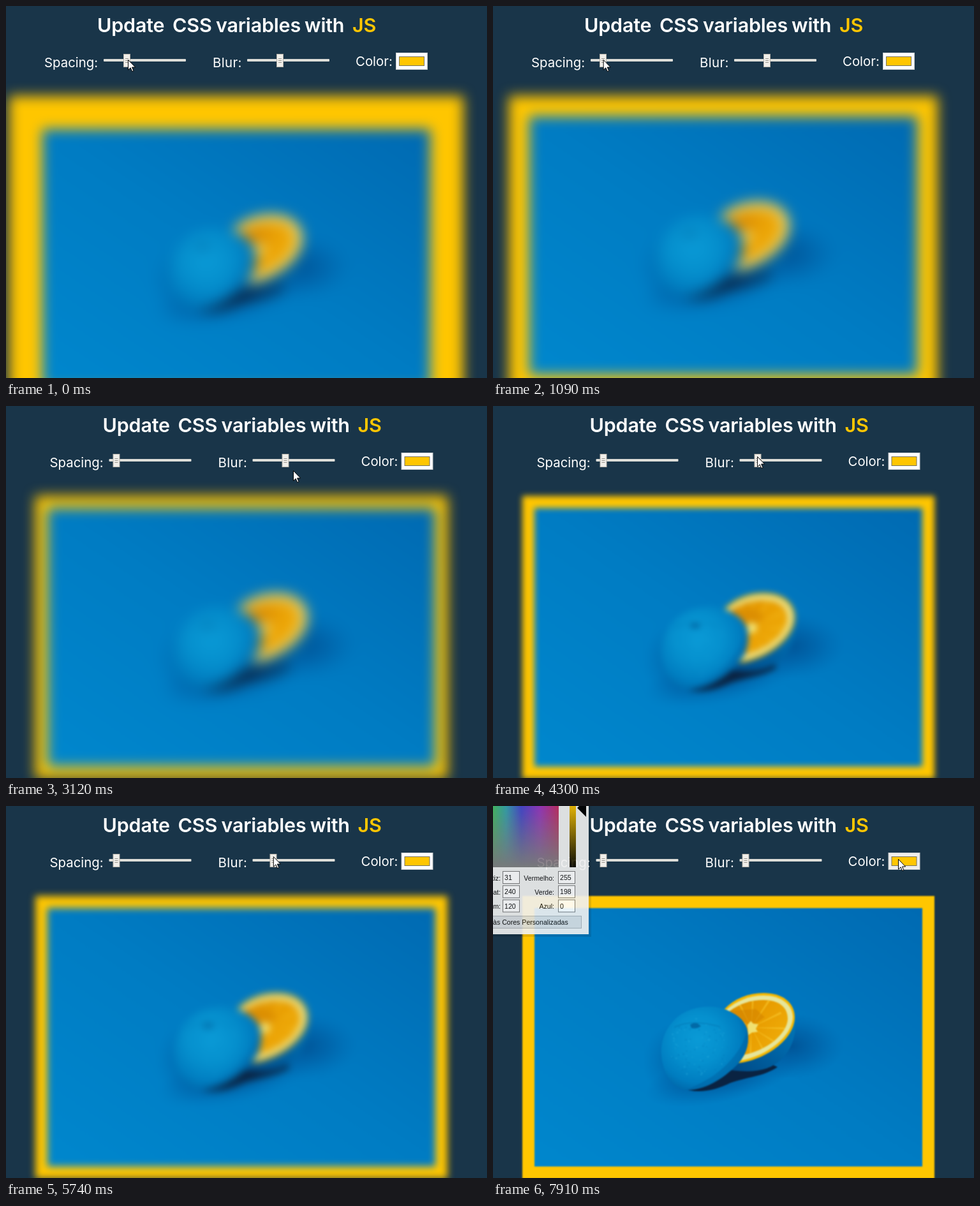
An HTML page for the animation above (8000 ms loop, 754x583 px).

```html
<!DOCTYPE html>
<html lang="en">
<head>
<meta charset="utf-8">
<title>Update CSS variables with JS</title>
<style>
  :root { --pad: 52px; --blur: 10px; --shift: 0px; }
  html, body { margin: 0; width: 100%; height: 100%; overflow: hidden; background: #193549; }
  #stage { position: absolute; inset: 0; overflow: hidden; }
  #photo {
    position: absolute; top: 141px; left: calc(56.5px + var(--shift) - var(--pad));
    width: 608px; height: 405px; padding: var(--pad);
    background: #ffc600; filter: blur(var(--blur));
  }
  #photo svg { display: block; }
  #ui { position: absolute; left: 0; top: 0; }
  #head { transform: translateX(var(--shift)); fill: #fff; font: 20.4px Inter, sans-serif; }
  #title { font-size: 30.5px; font-weight: 600; letter-spacing: -.2px; }
  #dialog { font: 10.6px "Liberation Sans", sans-serif; fill: #111; transform-origin: -90px 20px; }
  .end { text-anchor: end; }
  .box { fill: #fff; stroke: #7a7a7a; }
</style>
</head>
<body>
<div id="stage">
  <div id="photo">
    <svg width="608" height="405" viewBox="65 160 608 405">
      <defs>
        <linearGradient id="wall" x1="0" y1="1" x2="1" y2="0">
          <stop offset="0" stop-color="#0087cd"/>
          <stop offset=".5" stop-color="#007cc3"/>
          <stop offset="1" stop-color="#006ab2"/>
        </linearGradient>
        <radialGradient id="shade">
          <stop offset="0" stop-color="#004c8e" stop-opacity=".85"/>
          <stop offset=".5" stop-color="#00559a" stop-opacity=".5"/>
          <stop offset="1" stop-color="#0060a8" stop-opacity="0"/>
        </radialGradient>
        <radialGradient id="dome" gradientUnits="userSpaceOnUse" cx="322" cy="366" r="84">
          <stop offset="0" stop-color="#0a9ad6"/>
          <stop offset=".45" stop-color="#0590ce"/>
          <stop offset=".8" stop-color="#007dc0"/>
          <stop offset="1" stop-color="#0068aa"/>
        </radialGradient>
        <linearGradient id="under" x1="0" y1="1" x2="1" y2="0">
          <stop offset="0" stop-color="#004a86"/>
          <stop offset=".6" stop-color="#0066a8"/>
          <stop offset="1" stop-color="#0078b8"/>
        </linearGradient>
        <linearGradient id="pulp" x1="0" y1="0" x2="1" y2=".5">
          <stop offset="0" stop-color="#d88a00"/>
          <stop offset=".6" stop-color="#e89c00"/>
          <stop offset="1" stop-color="#eeaa08"/>
        </linearGradient>
        <clipPath id="cut"><path id="fleshPath" d="M370 322C388 309 405 304 424 304C448 304 462 315 462 334C461 356 431 384 388 391L350 360Z"/></clipPath>
      </defs>
      <rect x="65" y="160" width="608" height="405" fill="url(#wall)"/>
      <ellipse cx="465" cy="376" rx="86" ry="52" fill="url(#shade)"/>
      <ellipse cx="360" cy="424" rx="125" ry="40" fill="url(#shade)" transform="rotate(-13 360 424)"/>
      <ellipse cx="290" cy="400" rx="56" ry="62" fill="url(#shade)" opacity=".6"/>
      <path d="M296 442C320 452 348 446 372 434C396 425 425 424 446 409L430 402L365 404Z" fill="#0a2342"/>
      <path d="M473 328C476 356 471 378 452 397C436 413 412 419 373 414L390 390Z" fill="url(#under)"/>
      <path d="M362 319C378 302 400 293 424 293C453 293 472 307 473 330C474 363 431 397 385 403L350 360Z" fill="#f6b800"/>
      <path d="M365 320C382 305 402 297 424 297C451 297 469 310 470 331C469 360 431 392 387 399L350 360Z" fill="#e6e59a"/>
      <use href="#fleshPath" fill="url(#pulp)"/>
      <g clip-path="url(#cut)">
        <circle cx="405" cy="347" r="26" fill="none" stroke="#f7c428" stroke-width="52" stroke-dasharray="1.6 12" opacity=".7"/>
        <path d="M372 321L412 318L426 331L404 346L384 333Z" fill="#d18200" opacity=".5"/>
        <path d="M399 343L404 337L408 341L416 342L412 349L415 354L406 355L400 359Z" fill="#f0e070"/>
      </g>
      <path d="M365 319C347 312 320 313 299 324C276 337 262 363 264 390C266 418 280 442 303 445C334 446 366 423 385 403C399 387 403 368 398 348C392 333 381 326 365 319Z" fill="url(#dome)"/>
      <path d="M301 445C336 447 366 424 385 403C399 387 403 368 398 348C396 374 372 405 342 425C326 434 314 441 301 445Z" fill="#00609f" opacity=".45"/>
      <g id="peel"></g>
      <path d="M309 343Q315 338 321 341L326 345Q319 350 311 348Z" fill="#005c98" opacity=".75"/>
      <path d="M284 347Q310 333 356 346" fill="none" stroke="#0070ac" stroke-width="2" opacity=".4"/>
    </svg>
  </div>

  <svg id="ui" width="754" height="583" viewBox="0 0 754 583">
    <defs>
      <g id="track"><rect y="83" width="129" height="4" rx="1" fill="#deded9"/></g>
      <g id="thumb">
        <rect x="-5" y="75.5" width="10" height="20" fill="#f1efea" stroke="#b5b1a8"/>
        <path d="M-2.5 82.5h5M-2.5 85.5h5M-2.5 88.5h5" stroke="#96928a"/>
      </g>
      <linearGradient id="hue">
        <stop offset="0" stop-color="#3cc85a"/>
        <stop offset=".2" stop-color="#28aab4"/>
        <stop offset=".43" stop-color="#3c3cdc"/>
        <stop offset=".72" stop-color="#a028c8"/>
        <stop offset="1" stop-color="#d21e5a"/>
      </linearGradient>
      <linearGradient id="gray" x1="0" x2="0" y1="0" y2="1">
        <stop offset="0" stop-color="#808080" stop-opacity=".15"/>
        <stop offset="1" stop-color="#808080"/>
      </linearGradient>
      <linearGradient id="lum" x1="0" x2="0" y1="0" y2="1">
        <stop offset="0" stop-color="#f4be00"/>
        <stop offset="1" stop-color="#0c0a00"/>
      </linearGradient>
    </defs>
    <g id="head">
      <text id="title" y="41"><tspan x="143">Update</tspan> <tspan x="261">CSS</tspan> <tspan x="329">variables</tspan> <tspan x="468">with</tspan> <tspan x="543" fill="#ffc600">JS</tspan></text>
      <text x="60" y="96">Spacing:</text>
      <text x="324" y="96" letter-spacing=".4">Blur:</text>
      <text x="548" y="94">Color:</text>
      <use href="#track" x="153"/>
      <use href="#track" x="378"/>
      <use href="#thumb" id="spacing"/>
      <use href="#thumb" id="blur"/>
      <rect id="well" x="611.5" y="73.5" width="49" height="26" fill="#fff" stroke="#c4c8ca"/>
      <rect x="616.5" y="79.5" width="39" height="14" fill="#ffc600" stroke="#77735f"/>
    </g>
    <g id="dialog">
      <rect x="-200" y="-200" width="354" height="405" fill="#000" opacity=".12"/>
      <rect x="-200" y="-200" width="350" height="401" fill="#f0f0f0"/>
      <rect x="0" y="0" width="103" height="96" fill="url(#hue)"/>
      <rect x="0" y="0" width="103" height="96" fill="url(#gray)"/>
      <rect x="120" y="0" width="10" height="96" fill="url(#lum)"/>
      <path d="M132 3L146 -11V17Z" fill="#000"/>
      <g id="fields"></g>
      <rect x="-60" y="172.5" width="198.5" height="19" fill="#d9dde0" stroke="#aeb2b6"/>
      <text x="0" y="186">às Cores Personalizadas</text>
    </g>
    <path id="cursor" d="M.5.5V16.2L4.1 12.8L6.7 18.6L9 17.6L6.5 12H11.6Z" fill="#fff" stroke="#000"/>
  </svg>
</div>
<script>
const LOOP = 8000;
const $ = id => document.getElementById(id);

// Step tracks: each row holds from its time until the next row.
const PAD = [[0, 52], [120, 60], [580, 58], [710, 55], [850, 48], [970, 40], [1090, 32],
  [1240, 27], [1390, 18], [1510, 10], [2060, 11], [2180, 12], [2300, 13],
  [2610, 15], [2730, 17], [2850, 19]];
const BLUR = [[0, 10], [3760, 7], [3880, 5], [4030, 2], [4160, 1], [4300, 5], [4420, 9],
  [4540, 11], [4690, 8], [4820, 6], [4960, 3], [5080, 0], [5330, 1], [5470, 1.5],
  [5590, 2], [5740, 6], [5860, 5], [6010, 3.6], [6130, 3], [6560, 2.2], [6680, 1.8],
  [6960, 1.3], [7090, 1]];
const MOVE = [[1510, 161.5, 84], [1910, 164, 84], [2060, 165, 84], [2300, 167, 84],
  [2610, 169, 84], [2850, 172, 84], [2970, 270, 93], [3120, 450, 101], [3240, 452, 98],
  [3370, 449, 93], [3510, 438, 79], [6960, 397, 79], [7090, 532, 111], [7230, 576, 104],
  [7360, 618, 99], [7500, 641, 84], [7910, 635, 83]];

function at(track, t) {
  let row = track[0];
  for (const r of track) if (r[0] <= t) row = r;
  return row;
}

function pointer(t, spacingX, blurX, blur) {
  if (t < 1510) return [spacingX + (t < 120 ? 2 : 1), 84];
  if (t >= 3760 && t < 6960) return blur ? [blurX - 1, 79] : [383, 84];
  return at(MOVE, t).slice(1);
}

function draw(t) {
  const pad = at(PAD, t)[1], blur = at(BLUR, t)[1];
  const shift = t < 1390 ? 0 : 8.5;
  const knob = 158 + ((t < 120 ? 60 : pad) - 10) / 1.61;
  const blurKnob = 383 + blur * 4.72;
  const root = document.documentElement.style;
  root.setProperty('--pad', pad + 'px');
  root.setProperty('--blur', blur + 'px');
  root.setProperty('--shift', shift + 'px');
  $('spacing').setAttribute('x', Math.round(knob) + .5);
  $('blur').setAttribute('x', Math.round(blurKnob) - .5);
  $('well').setAttribute('fill', t < 7500 ? '#fff' : '#efeeec');
  const [x, y] = pointer(t, knob + shift, blurKnob + shift, blur);
  $('cursor').setAttribute('transform', `translate(${x} ${y})`);
  const open = t < 7780 ? 0 : t < 7910 ? .4 : .91;
  $('dialog').style.opacity = open;
  $('dialog').style.transform = open === .4 ? 'scale(.96)' : 'none';
}

// Dimples on the peel
let seed = 7;
const rnd = () => (seed = seed * 16807 % 2147483647) / 2147483647;
let dots = '';
for (let i = 0; i < 110; i++) {
  const a = rnd() * 6.283, r = Math.sqrt(rnd()) * 48;
  dots += `<circle cx="${322 + r * Math.cos(a)}" cy="${378 + r * .95 * Math.sin(a)}" r="${.6 + rnd()}" fill="${i % 2 ? '#2cb0e0' : '#0078b8'}" opacity=".35"/>`;
}
$('peel').innerHTML = dots;

// Number fields of the colour dialog
$('fields').innerHTML = [['Matiz:', 31, 'Vermelho:', 255], ['Sat:', 240, 'Verde:', 198], ['Lum:', 120, 'Azul:', 0]]
  .map(([a, n, b, m], i) => {
    const y = 102.5 + i * 22.3;
    const field = (x, w, v) => `<rect class="box" x="${x}" y="${y}" width="${w}" height="19"/><text x="${x + 2.5}" y="${y + 13.5}">${v}</text>`;
    return `<text class="end" x="12" y="${y + 14}">${a}</text>${field(15.5, 26, n)}` +
      `<text class="end" x="96" y="${y + 14}">${b}</text>${field(102.5, 26, m)}`;
  }).join('');

const start = performance.now();
function tick() {
  draw((performance.now() - start) % LOOP);
  requestAnimationFrame(tick);
}
draw(0);
requestAnimationFrame(tick);
</script>
</body>
</html>
```
